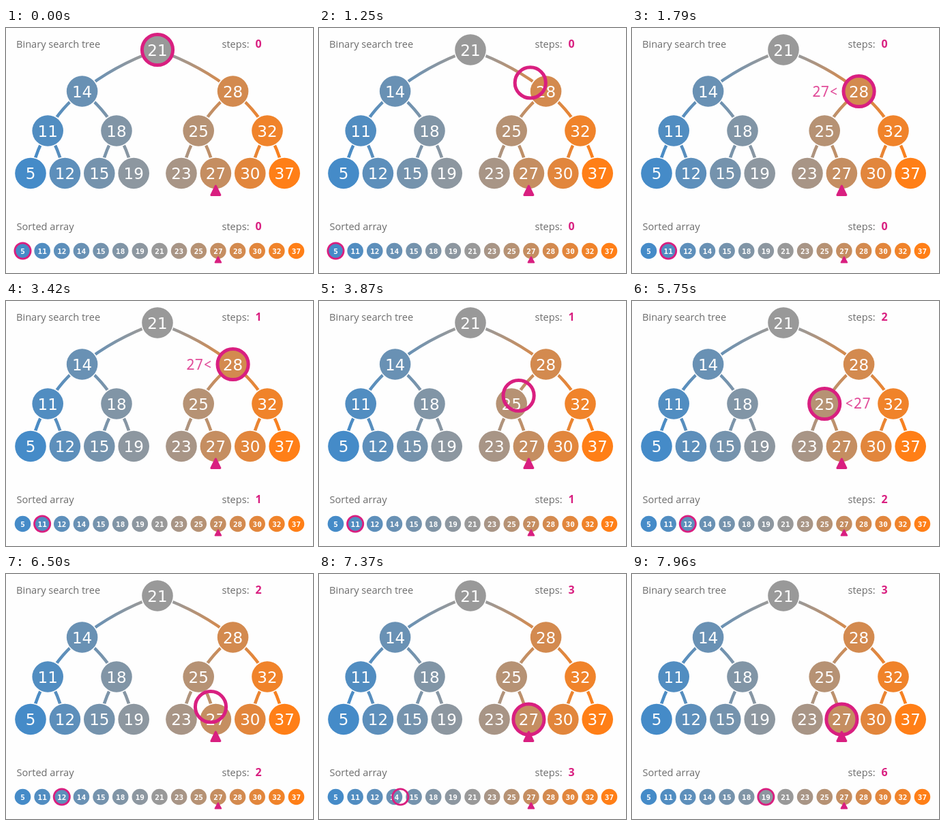
An HTML page with a canvas that plays this animation: 450 px wide and 360 px high, repeating every 8 s.

```html
<!DOCTYPE html>
<html lang="en">
<head>
<meta charset="utf-8">
<title>Binary search tree and sorted array</title>
<style>
html, body { margin: 0; width: 100%; height: 100%; overflow: hidden; background: #fefefe; }
canvas { display: block; }
</style>
</head>
<body>
<canvas id="stage" width="450" height="360"></canvas>
<script>
const ctx = document.getElementById('stage').getContext('2d');
const PINK = '#d91f80', PAPER = '#fefefe';
const FPS = 24, FRAMES = 192;
const values = [5, 11, 12, 14, 15, 18, 19, 21, 23, 25, 27, 28, 30, 32, 37];
const TARGET = 10;
const ROW_Y = 327.5;

// Moves: [first frame, length, index to, index from]
const treeMoves = [[23, 12, 11, 7], [86, 12, 9, 11], [150, 12, 10, 9]];
const arrayMoves = [[34, 5, 1, 0], [97, 5, 2, 1], [157, 5, 3, 2],
                    [176, 5, 4, 3], [181, 5, 5, 4], [186, 5, 6, 5]];
const treeCounts = [44, 102, 162];
const arrayCounts = [44, 102, 162, 181, 186, 191];

const clamp = v => Math.max(0, Math.min(1, v));
const mix = (a, b, t) => a + (b - a) * t;
const easeOut = t => Math.sin(t * Math.PI / 2);
const count = (marks, f) => marks.filter(m => f >= m).length;

function color(i) {
  const blue = [69, 139, 200], gray = [153, 153, 153], orange = [255, 127, 23];
  const t = i / 7;
  const c = gray.map((g, k) => Math.round(t < 1 ? mix(blue[k], g, t) : mix(g, orange[k], t - 1)));
  return `rgb(${c})`;
}

// In-order index to tree position; depth follows from the trailing bits.
function treePos(i) {
  const y = i === 7 ? 32 : i % 4 === 3 ? 93 : i % 2 ? 151 : 213.5;
  const x = i === 7 ? 222 : i < 7 ? 36 + 25.2 * i : 257 + 25.2 * (i - 8);
  return [x, y];
}
const arrayPos = i => [24.5 + 28.64 * i, ROW_Y];

function track(moves, place, f) {
  let pos = place(moves[0][3]);
  for (const [start, length, to, from] of moves) {
    if (f < start) break;
    const t = easeOut(clamp((f - start) / length));
    const a = place(from), b = place(to);
    pos = [mix(a[0], b[0], t), mix(a[1], b[1], t)];
  }
  return pos;
}

function text(str, x, y, font, fill, align = 'left') {
  ctx.font = font;
  ctx.fillStyle = fill;
  ctx.textAlign = align;
  ctx.fillText(str, x, y);
}

function circle([x, y], r) {
  ctx.beginPath();
  ctx.arc(x, y, r, 0, Math.PI * 2);
}

function ring(pos, r, width) {
  circle(pos, r);
  ctx.strokeStyle = PINK;
  ctx.lineWidth = width;
  ctx.stroke();
}

function edge(from, to) {
  const [px, py] = treePos(from), [cx, cy] = treePos(to);
  const g = ctx.createLinearGradient(px, py, cx, cy);
  g.addColorStop(0.2, color(from));
  g.addColorStop(0.8, color(to));
  ctx.beginPath();
  ctx.moveTo(px, py);
  ctx.quadraticCurveTo(mix((px + cx) / 2, cx, 0.2), mix((py + cy) / 2, py, 0.2), cx, cy);
  ctx.strokeStyle = g;
  ctx.lineWidth = 4.5;
  ctx.stroke();
}

function pointer(x, top, halfWidth, bottom, round) {
  const r = round / 2;
  ctx.beginPath();
  ctx.moveTo(x, top + r);
  ctx.lineTo(x + halfWidth - r, bottom - r);
  ctx.lineTo(x - halfWidth + r, bottom - r);
  ctx.closePath();
  ctx.lineJoin = 'round';
  ctx.lineWidth = round;
  ctx.strokeStyle = ctx.fillStyle = PINK;
  ctx.fill();
  ctx.stroke();
}

function header(title, x, y, steps) {
  const font = '14.6px "Open Sans", sans-serif';
  text(title, x, y, font, '#6c6c6c');
  text('steps:', 316.5, y, font, '#6c6c6c');
  text(steps, 370, y, 'bold 16px "Open Sans", sans-serif', PINK, 'center');
}

function hint(str, x, y, alpha) {
  ctx.globalAlpha = alpha;
  text(str, x, y, '21px "Noto Sans Mono", monospace', PINK);
  ctx.globalAlpha = 1;
}

// Fades in over five frames, then out over five.
const fade = (f, from, to) => clamp((f - from) / 5) * clamp(1 - (f - to) / 5);

function draw(f) {
  ctx.fillStyle = PAPER;
  ctx.fillRect(0, 0, 450, 360);
  header('Binary search tree', 15, 29, count(treeCounts, f));
  header('Sorted array', 15.5, 297, count(arrayCounts, f));

  for (const span of [4, 2, 1])
    for (let i = 2 * span - 1; i < 15; i += 4 * span) {
      edge(i, i - span);
      edge(i, i + span);
    }

  values.forEach((value, i) => {
    const node = treePos(i), cell = arrayPos(i);
    circle(node, 24.3);
    ctx.fillStyle = PAPER;
    ctx.fill();
    ctx.fillStyle = color(i);
    circle(node, 22.8);
    ctx.fill();
    circle(cell, 11.8);
    ctx.fill();
    text(value, node[0], node[1] + 8.5, '23px "DejaVu Sans", sans-serif', '#fff', 'center');
    text(value, cell[0], cell[1] + 4, 'bold 11px "DejaVu Sans Mono", monospace', '#fff', 'center');
  });

  pointer(treePos(TARGET)[0], 230.5, 8, 247, 3);
  pointer(arrayPos(TARGET)[0], 335.5, 5.3, 345.5, 2);
  hint('27<', 264, 100.5, fade(f, 39, 81));
  hint('<27', 312, 158, fade(f, 111, 137));
  ring(track(treeMoves, treePos, f), 22.6, 5);
  ring(track(arrayMoves, arrayPos, f), 11.6, 2.8);
}

function tick() {
  draw(Math.floor((performance.now() + 5) * FPS / 1000) % FRAMES);
  requestAnimationFrame(tick);
}
tick();
</script>
</body>
</html>
```
